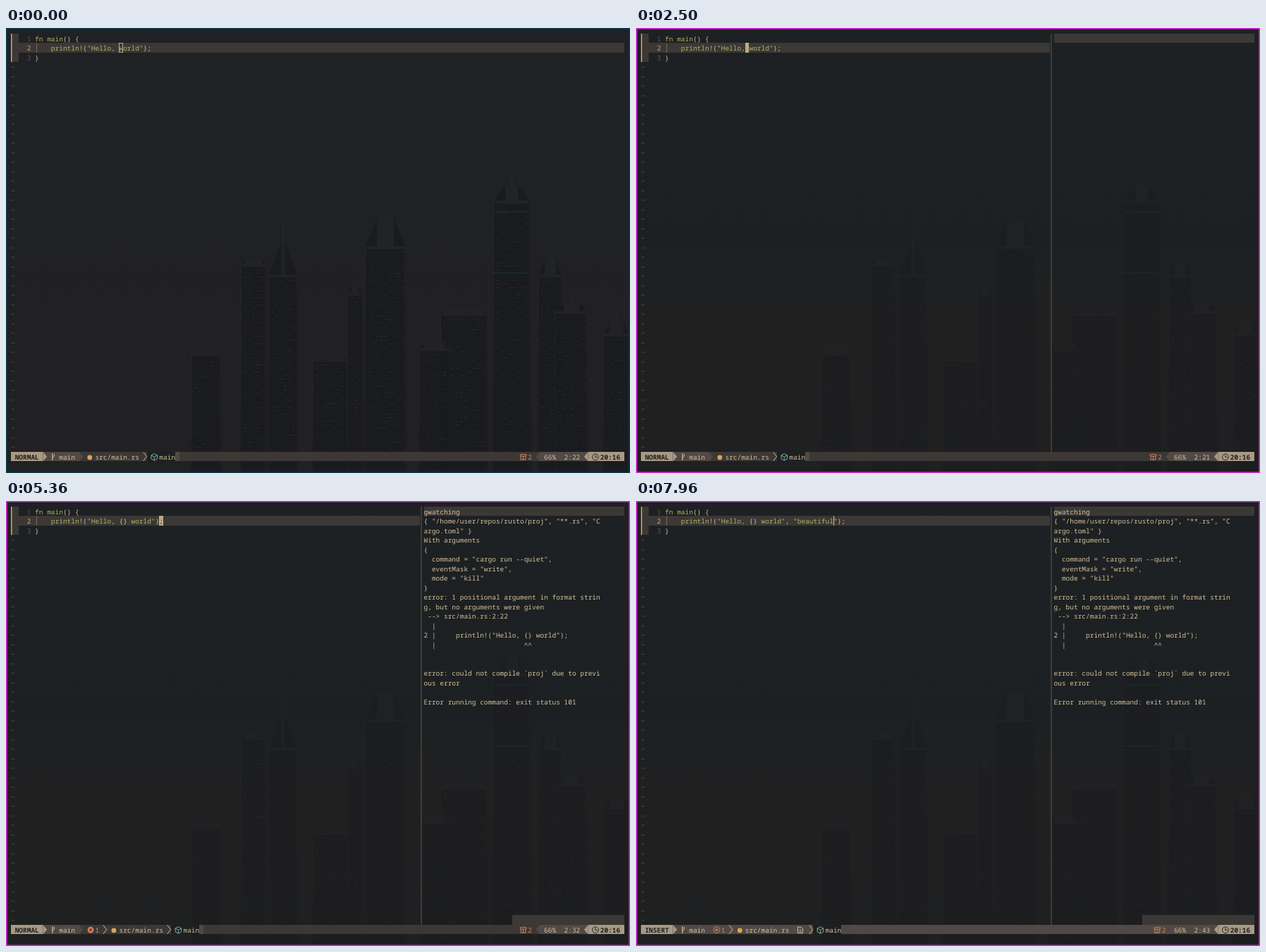
Recreate the animation shown at these times as an HTML page with a canvas. Size 885x632 px, loop 8 s.

```html
<!DOCTYPE html>
<html lang="en">
<head>
<meta charset="utf-8">
<title>Terminal editor</title>
<style>
  html, body { margin: 0; width: 100%; height: 100%; overflow: hidden; background: #1d2022; }
  canvas { display: block; width: 885px; height: 632px; }
</style>
</head>
<body>
<canvas id="stage" width="885" height="632"></canvas>
<script>
const W = 885, H = 632, LOOP = 8000;
const X0 = 7, Y0 = 7.9, CW = 5.685, CH = 13.5;
const STATUS = 44, SPLIT = 103, CODE = 6;
const C = {
  dark: '#1d2021', line: '#3c3836', panel: '#504945', match: '#5f564f', tan: '#a89984',
  fg: '#d4be98', green: '#a9b665', yellow: '#d8a657', orange: '#d5835a', aqua: '#89b482',
  blue: '#7daea3', key: '#b5b04e', dim: '#5d564f', cursor: '#bfa888'
};

const stage = document.getElementById('stage');
const ctx = stage.getContext('2d');
const colX = c => X0 + c * CW;
const rowY = r => Y0 + r * CH;

// ---------- timeline: each entry changes part of the state ----------
const typed = s => `println!("Hello, {} world"${s});`;
const HELLO = 'println!("Hello, world");';
const EVENTS = [
  [0, { focus: 0, insert: false, cur: 21, code: HELLO, match: [], menu: 0, split: false,
        out: 0, dirty: false, err: false, notice: false, complete: false }],
  [180, { focus: 0.35 }], [245, { focus: 0.7 }], [310, { focus: 1 }],
  [920, { insert: true }],
  [1500, { insert: false, cur: 20 }],
  [1980, { menu: 1 }], [2110, { menu: 2 }],
  [2500, { menu: 0, split: true }], [2540, { out: 9 }],
  [3470, { insert: true }],
  [4110, { cur: 21, code: 'println!("Hello,  world");', dirty: true }],
  [4440, { cur: 22, code: typed(''), match: [21, 22] }],
  [4480, { cur: 23 }],
  [4950, { cur: 22, insert: false }],
  [5190, { dirty: false }],
  [5280, { out: 21, notice: true }],
  [5360, { err: true, cur: 31, match: [] }],
  [5660, { cur: 30, match: [12, 30] }],
  [5860, { insert: true }],
  [6090, { cur: 31, code: typed(','), match: [12, 31], dirty: true }],
  [6230, { cur: 32, code: typed(', '), match: [12, 32] }],
  [6520, { cur: 33, code: typed(', ""'), match: [] }]
];
const WORD = 'beautiful';
[6780, 6820, 6900, 6980, 7120, 7510, 7650, 7740, 7960].forEach((t, i) =>
  EVENTS.push([t, { cur: 34 + i, code: typed(`, "${WORD.slice(0, i + 1)}"`), complete: i === 1 }]));

const OUTPUT = [
  'gwatching',
  '{ "/home/user/repos/rusto/proj", "**.rs", "C', 'argo.toml" }',
  'With arguments', '{', '  command = "cargo run --quiet",', '  eventMask = "write",',
  '  mode = "kill"', '}',
  'error: 1 positional argument in format strin', 'g, but no arguments were given',
  ' --> src/main.rs:2:22', '  |', '2 |     println!("Hello, {} world");',
  '  |' + ' '.repeat(22) + '^^', '', '',
  'error: could not compile `proj` due to previ', 'ous error', '',
  'Error running command: exit status 101'
];

// key column, then rows of "key description"
const MENU = [
  [11, [', Switch Buffer', '- Split window below', '/ Find in Files (Grep)',
        ': Command History', '` Switch to Other Buffer', '| Split window right']],
  [44, ['<CR> Terminal', '<space> File browser', 'l Lazy', 'y yank yaml key/value',
        '<tab> +tabs', 'b +buffer']],
  [79, ['c +code', 'd +dap', 'f +file/find', 'g +git', 'q +quit/session', 'r +run']],
  [114, ['s +search', 't +test', 'u +ui', 'w +windows', 'x +diagnostics/quickfix']]
];
const SUBMENU = [[11, ['w Watch']]];
const SNIPPETS = ['bench~', 'BEERWARE~', 'BSD2~', 'BSD3~', 'BSD4~', 'mod-block~', 'include_bytes~'];

// ---------- drawing helpers ----------
function text(str, col, row, color, bold = false) {
  ctx.font = `${bold ? 'bold ' : ''}9.475px "Noto Sans Mono", "DejaVu Sans Mono", monospace`;
  ctx.fillStyle = color;
  [...str].forEach((ch, i) => {
    if (ch !== ' ') ctx.fillText(ch, colX(col + i), rowY(row) + 10.8);
  });
}
function cells(col, row, cols, rows, color) {
  ctx.fillStyle = color;
  const x = Math.round(colX(col)), y = Math.round(rowY(row));
  ctx.fillRect(x, y, Math.round(colX(col + cols)) - x, Math.round(rowY(row + rows)) - y);
}
function path(points, color, fill = false, width = 1) {
  ctx.beginPath();
  points.forEach(([x, y], i) => i ? ctx.lineTo(x, y) : ctx.moveTo(x, y));
  if (fill) { ctx.fillStyle = color; ctx.fill(); }
  else { ctx.strokeStyle = color; ctx.lineWidth = width; ctx.stroke(); }
}
function circle(x, y, r, color, fill = true) {
  ctx.beginPath();
  ctx.arc(x, y, r, 0, Math.PI * 2);
  ctx.fillStyle = ctx.strokeStyle = color;
  ctx.lineWidth = 1;
  fill ? ctx.fill() : ctx.stroke();
}
// powerline wedge and thin chevron on the status row
function wedge(col, color, left = false) {
  const a = colX(col + (left ? 1 : 0)), b = colX(col + (left ? 0 : 1));
  const top = rowY(STATUS), end = rowY(STATUS + 1);
  path([[a, top], [b, (top + end) / 2], [a, end]], color, true);
}
function chevron(col) {
  const x = colX(col), top = rowY(STATUS), end = top + CH;
  path([[x, top + 0.5], [x + 5, (top + end) / 2], [x, end - 0.5]], C.fg);
}

// ---------- night skyline behind the editor ----------
const city = document.createElement('canvas');
city.width = W; city.height = H;
(function paintCity() {
  const g = city.getContext('2d');
  let seed = 7;
  const rnd = () => (seed = (seed * 16807) % 2147483647) / 2147483647;
  // left, right, shoulder height, roof width, roof height, spire height
  const towers = [
    [434, 486, 470, 40, 468, 468], [615, 684, 405, 58, 398, 398],
    [262, 306, 462, 42, 451, 451], [332, 370, 335, 24, 329, 329],
    [371, 415, 350, 5, 305, 275], [483, 508, 376, 10, 368, 365],
    [508, 568, 310, 24, 270, 262], [585, 632, 455, 30, 446, 446],
    [690, 745, 245, 18, 224, 208], [754, 790, 350, 16, 328, 325],
    [778, 826, 402, 22, 390, 380], [846, 885, 434, 20, 417, 405]
  ];
  for (const [l, r, shoulder, roofW, roof, spire] of towers) {
    const mid = (l + r) / 2;
    g.fillStyle = 'rgba(25,27,30,.8)';
    g.beginPath();
    g.moveTo(l, H); g.lineTo(l + 2, shoulder);
    g.lineTo(mid - roofW / 2, roof); g.lineTo(mid + roofW / 2, roof);
    g.lineTo(r - 2, shoulder); g.lineTo(r, H);
    g.fill();
    g.fillStyle = 'rgba(95,98,100,.1)';
    g.fillRect(l + 3, shoulder, r - l - 6, 4);
    g.fillRect(mid - roofW / 2, roof, roofW, shoulder - roof);
    g.fillRect(mid - 0.7, spire, 1.4, roof - spire);
    g.fillRect(l + 1, shoulder, 1, H - shoulder);
    g.fillRect(r - 3, shoulder, 1, H - shoulder);
    for (let y = shoulder + 8; y < 612; y += 5)
      for (let x = l + 5; x < r - 6; x += 6)
        if (rnd() < 0.35) {
          g.fillStyle = `rgba(115,112,102,${0.06 + rnd() * 0.13})`;
          g.fillRect(x, y, 2 + rnd() * 3, 1);
        }
  }
  g.fillStyle = 'rgba(20,95,60,.25)';
  g.fillRect(694, 260, 48, 2);
  g.fillRect(689, 347, 52, 2);
})();

const mix = (a, b, k) => `rgb(${a.map((v, i) => Math.round(v + (b[i] - v) * k))})`;

function background(focus) {
  const grad = ctx.createLinearGradient(0, 0, 0, H);
  grad.addColorStop(0, mix([32, 33, 37], [29, 33, 35], focus));
  grad.addColorStop(0.48, mix([32, 33, 36], [29, 32, 34], focus));
  grad.addColorStop(0.66, mix([33, 32, 35], [32, 32, 33], focus));
  grad.addColorStop(1, mix([33, 32, 35], [31, 32, 33], focus));
  ctx.fillStyle = grad;
  ctx.fillRect(0, 0, W, H);
  ctx.globalAlpha = 1 - focus * 0.5;
  ctx.drawImage(city, 0, 0);
  ctx.globalAlpha = 1;
  ctx.strokeStyle = mix([9, 57, 70], [214, 42, 214], focus);
  ctx.lineWidth = 1.6;
  ctx.strokeRect(0.8, 0.8, W - 1.6, H - 1.6);
}

// ---------- editor parts ----------
function editor(s) {
  cells(0, 0, 2, 3, C.line);
  ctx.fillStyle = C.yellow;
  ctx.fillRect(7, rowY(0), 1.5, CH * 3);
  cells(2, 1, (s.split ? SPLIT - 1 : 153) - 2, 1, C.line);
  text('1', 4, 0, C.dim);
  text('2', 4, 1, C.yellow);
  text('3', 4, 2, C.dim);
  for (let r = 3; r < STATUS; r++) text('~', 0, r, C.dim);

  text('fn', CODE, 0, '#c8a65a');
  text('main', CODE + 3, 0, C.green);
  text('() {', CODE + 7, 0, C.fg);
  text('}', CODE, 2, C.fg);
  ctx.fillStyle = '#746a5f';
  ctx.fillRect(43, rowY(1), 1, CH);

  for (const m of s.match) cells(CODE + m, 1, 1, 1, C.match);
  const block = !s.insert && s.focus > 0;
  if (block) cells(CODE + s.cur, 1, 1, 1, C.cursor);
  let quoted = false;
  [...s.code].forEach((ch, i) => {
    const green = i < 8 || ((quoted || ch === '"') && !'{}'.includes(ch));
    if (ch === '"') quoted = !quoted;
    const covered = block && i + 4 === s.cur;
    text(ch, CODE + 4 + i, 1, covered ? C.dark : green ? C.green : C.fg);
  });
  const x = colX(CODE + s.cur);
  if (s.insert) {
    ctx.fillStyle = C.yellow;
    ctx.fillRect(x, rowY(1), 1.3, CH);
  } else if (!block) {
    ctx.strokeStyle = C.cursor;
    ctx.lineWidth = 1;
    ctx.strokeRect(Math.round(x) + 0.5, 21.5, 5, 13);
  }
}

function outputPane(s) {
  ctx.fillStyle = '#625a53';
  ctx.fillRect(588.5, rowY(0), 1, CH * STATUS);
  cells(SPLIT, 0, 50, 1, C.line);
  OUTPUT.slice(0, s.out).forEach((line, r) => text(line, SPLIT, r, C.fg));
}

function keyMenu(groups, top, prefix) {
  cells(0, top, 153, STATUS - top, C.panel);
  for (const [keyCol, rows] of groups)
    rows.forEach((entry, i) => {
      const at = entry.indexOf(' '), key = entry.slice(0, at), label = entry.slice(at + 1);
      const row = top + 1 + i;
      text(key, keyCol + 1 - key.length, row, C.key);
      text('→', keyCol + 2, row, C.fg);
      text(label, keyCol + 4, row, label[0] === '+' ? C.orange : C.aqua);
    });
  text(prefix, 2, 43, C.orange);
  text('<esc>', 61, 43, C.key);
  text('close', 67, 43, C.orange);
  text('<bs>', 73, 43, C.key);
  text('go up one level', 78, 43, C.orange);
}

function completion() {
  cells(38, 2, 26, 7, C.panel);
  cells(38, 2, 26, 1, C.tan);
  SNIPPETS.forEach((name, i) => {
    const row = 2 + i, hit = name.toLowerCase().indexOf('b');
    const kind = i ? C.key : '#3c4a45';
    text(name, 39, row, i ? C.fg : C.dark);
    text(name[hit], 39 + hit, row, i ? C.aqua : '#33675f');
    const x = Math.round(colX(54)) + 0.5, y = Math.round(rowY(row)) + 3.5;
    path([[x + 2, y + 7], [x, y + 7], [x, y], [x + 8, y], [x + 8, y + 7], [x + 6, y + 7]], kind);
    text('Snippet', 56, row, kind);
  });
}

// ---------- status line ----------
function branchIcon(x, y) {
  path([[x + 2, y - 5], [x + 2, y + 5]], C.fg, false, 1.2);
  path([[x + 2, y + 1], [x + 4.5, y - 1], [x + 4.5, y - 4]], C.fg);
}
function cubeIcon(x, y, color) {
  path([[x, y - 2.5], [x + 4.3, y - 4.8], [x + 8.6, y - 2.5], [x + 8.6, y + 2.5],
        [x + 4.3, y + 4.8], [x, y + 2.5], [x, y - 2.5], [x + 4.3, y], [x + 8.6, y - 2.5]], color);
  path([[x + 4.3, y], [x + 4.3, y + 4.8]], color);
}
function boxIcon(x, y) {
  path([[x + 1, y - 1], [x + 1, y + 4], [x + 8, y + 4], [x + 8, y - 1], [x + 9.5, y - 3],
        [x + 4.5, y - 4], [x, y - 3], [x + 1, y - 1], [x + 8, y - 1]], C.orange);
  path([[x + 4.5, y - 1], [x + 4.5, y + 4]], C.orange);
}
function docIcon(x, y) {
  path([[x, y - 4], [x + 4.5, y - 4], [x + 7, y - 1.5], [x + 7, y + 4.5], [x, y + 4.5], [x, y - 4.5]], C.fg);
  path([[x + 2, y], [x + 5, y]], C.fg);
  path([[x + 2, y + 2.3], [x + 5, y + 2.3]], C.fg);
}
function errorIcon(x, y, filled) {
  circle(x, y, 4.4, C.orange, filled);
  const ink = filled ? C.line : C.orange;
  path([[x - 1.7, y - 1.7], [x + 1.7, y + 1.7]], ink, false, 1.2);
  path([[x + 1.7, y - 1.7], [x - 1.7, y + 1.7]], ink, false, 1.2);
}

function statusLine(s) {
  const y = rowY(STATUS) + 7.2, ins = s.insert;
  const label = (str, col, color = C.fg, bold) => text(str, col, STATUS, color, bold);
  cells(0, STATUS, 153, 1, ins ? C.panel : C.line);
  cells(8, STATUS, 9, 1, C.panel);
  cells(0, STATUS, 8, 1, C.tan);
  wedge(8, C.tan);
  if (!ins) wedge(17, C.panel);
  label(ins ? 'INSERT' : 'NORMAL', 1, C.dark, true);
  branchIcon(colX(10), y);
  label('main', 12);

  let col = ins ? 18 : 19;
  if (s.err) {
    errorIcon(colX(col) + 5, y, !ins);
    label('1', col + 2, C.orange);
    chevron(col + 4);
    col += 6;
  }
  circle(colX(col) + 3.8, y + 0.8, 3.4, C.yellow);
  label('src/main.rs', col + 2);
  col += 13;
  if (s.dirty) {
    docIcon(colX(col + 2) + 0.8, y);
    col += 4;
  }
  cells(col + 2, STATUS, 7, 1, C.dark);
  chevron(col + 1);
  cubeIcon(colX(col + 3), y + 0.3, ins ? '#8fa39b' : C.blue);
  label('main', col + 5);
  if (!ins) cells(col + 9, STATUS, 1, 1, C.panel);

  const pack = ins ? 128 : 127;
  boxIcon(colX(pack), y);
  label('2', pack + 2, C.orange);
  cells(132, STATUS, 12, 1, C.panel);
  if (!ins) wedge(131, C.panel, true);
  label('66%', 133);
  label(`2:${s.cur + 1}`, 138);
  cells(144, STATUS, 9, 1, C.tan);
  wedge(143, C.tan, true);
  circle(colX(145) + 4.6, y + 0.2, 4.4, C.dark, false);
  path([[colX(145) + 4.6, y - 2.5], [colX(145) + 4.6, y + 0.5], [colX(145) + 7, y + 0.5]], C.dark);
  label('20:16', 147, C.dark, true);
}

function draw(s) {
  ctx.textRendering = 'geometricPrecision';
  background(s.focus);
  editor(s);
  if (s.split) outputPane(s);
  if (s.notice) cells(125, 43, 28, 1, C.line);
  if (s.menu === 1) keyMenu(MENU, 35, '<leader>');
  if (s.menu === 2) keyMenu(SUBMENU, 37, '<leader>r');
  if (s.complete) completion();
  statusLine(s);
}

let shown = -1;
const start = performance.now();
function tick() {
  const t = (performance.now() - start) % LOOP;
  const past = EVENTS.filter(([at]) => at <= t);
  if (past.length !== shown) {
    shown = past.length;
    draw(Object.assign({}, ...past.map(([, change]) => change)));
  }
  requestAnimationFrame(tick);
}
tick();
</script>
</body>
</html>
```
